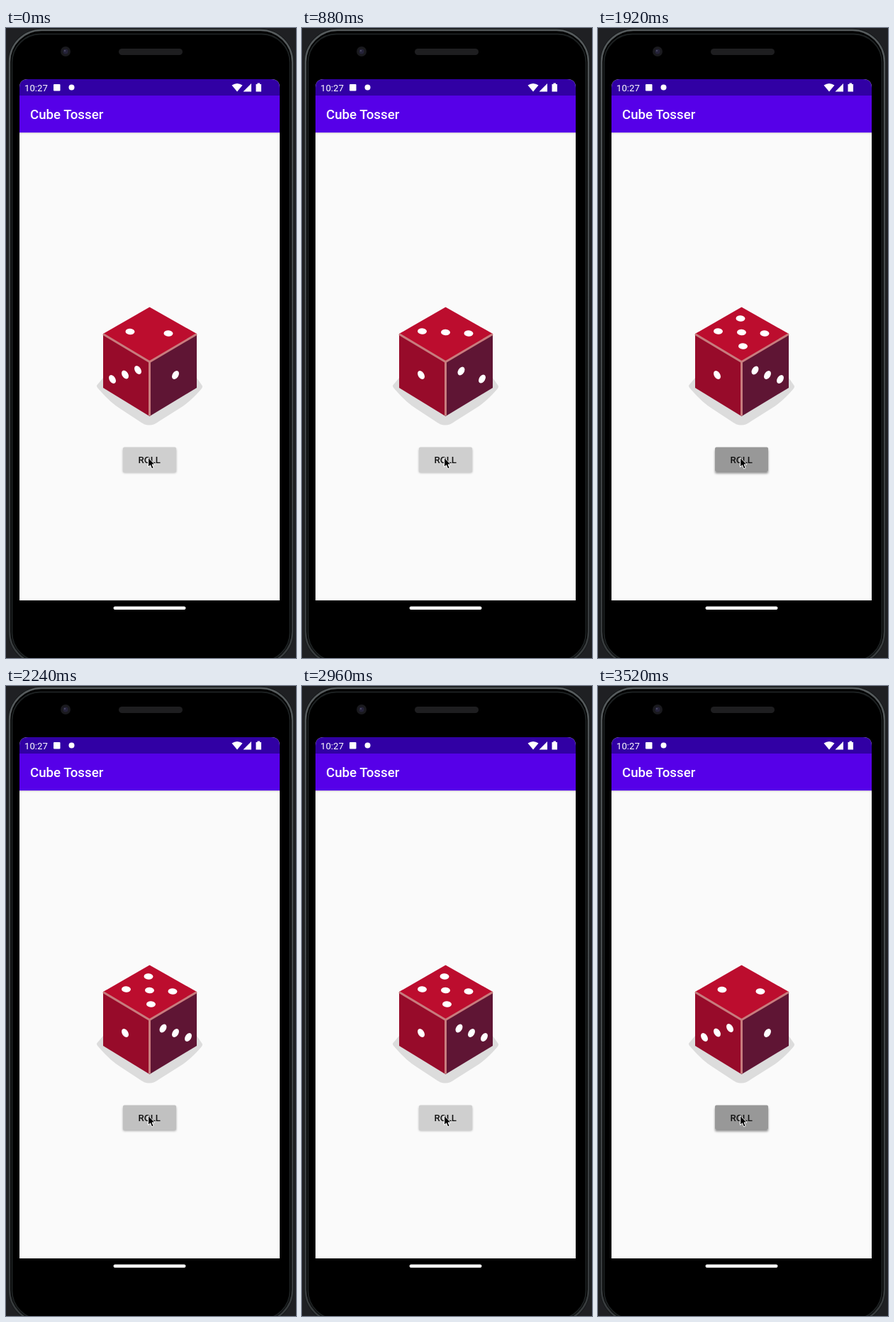
These frames come from a looping animation (409x886 px, 3.6 s). An HTML page:

```html
<!DOCTYPE html>
<html lang="en">
<head>
<meta charset="utf-8">
<title>Cube Tosser</title>
<style>
  html, body { margin: 0; width: 100%; height: 100%; overflow: hidden; background: #1f2023; }
  svg { display: block; width: 409px; height: 886px; font-family: Roboto, sans-serif; }
</style>
</head>
<body>
<svg viewBox="0 0 409 886">
  <defs>
    <linearGradient id="rim" x2="0" y2="1">
      <stop offset="0" stop-color="#565b5d"/>
      <stop offset=".15" stop-color="#4b5052"/>
      <stop offset="1" stop-color="#373b3d"/>
    </linearGradient>
    <filter id="soft" x="-20%" y="-40%" width="140%" height="180%">
      <feGaussianBlur stdDeviation="1.4"/>
    </filter>
  </defs>

  <!-- phone -->
  <rect width="409" height="886" fill="#1f2023"/>
  <rect x="3" y="1" width="403" height="895" rx="47" fill="#101314"/>
  <rect x="5" y="3" width="399" height="891" rx="45" fill="#000" stroke="url(#rim)" stroke-width="2.5"/>
  <rect x="8.5" y="8.5" width="392" height="882" rx="40" fill="#000" stroke="#1c2021" stroke-width="2"/>
  <rect x="159" y="29" width="90" height="9" rx="4.5" fill="#1e1e20"/>
  <circle cx="84" cy="33" r="7" fill="#1a1a1e"/>
  <circle cx="84" cy="33" r="3.5" fill="#25233a"/>
  <circle cx="83" cy="32" r="1" fill="#55556b"/>

  <!-- screen -->
  <path d="M19 805V84q0-12 12-12H374q12 0 12 12V805z" fill="#fafafa"/>
  <path d="M19 95V84q0-12 12-12H374q12 0 12 12V95z" fill="#3100a4"/>
  <rect x="19" y="147" width="367" height="2" fill="#e3e3e3"/>
  <rect x="19" y="95" width="367" height="52" fill="#5600e8"/>
  <rect x="151.500" y="813.500" width="102" height="4.500" rx="2.250" fill="#fff"/>
  <g fill="#fff">
    <text x="26" y="88.500" font-size="13.200">10:27</text>
    <text x="34" y="128" font-size="18.700" font-weight="500">Cube Tosser</text>
    <rect x="67" y="79" width="9.500" height="9.500" rx="1"/>
    <circle cx="92.500" cy="83.500" r="4"/>
    <path d="M318.500 80.500Q326 75.500 333.500 80.500L326 89.500z"/>
    <path d="M334.500 89.500L346 78V89.500z"/>
    <path d="M352.500 79h2v-1.500h3.500V79h2v10.500h-7.500z"/>
  </g>

  <!-- die -->
  <path d="M137 492L128.500 502Q127 504 130 507Q147 527 162 536L188 553Q202 564 216 553L243 536Q260 526 276 507Q278 504 276 502L269 492z" fill="#dcdcdc"/>
  <path d="M202.500 392.500L269 430L202.500 469L137 430z" fill="#bc0d2e"/>
  <path d="M137 430L202.500 469V546L137 506z" fill="#970b2a"/>
  <path d="M269 430L202.500 469V546L269 506z" fill="#5f1534"/>
  <path d="M137 430.500L202.500 469.500L269 430.500M202.500 469.500V545" fill="none" stroke="#c87c7e" stroke-width="3"/>
  <g id="pips" fill="#fff"></g>

  <!-- button -->
  <rect id="shadow" x="165" width="75" height="34" rx="2" filter="url(#soft)"/>
  <rect id="button" x="165" y="589.500" width="75" rx="2"/>
  <text x="186.500" y="612" font-size="13.100" font-weight="500" fill="#111">ROLL</text>
  <path d="M200.500 604V617.500L203.500 614.800L205.700 619.800L208.200 618.700L206 613.900H210z" fill="#000" stroke="#fff" stroke-width="1"/>
</svg>
<script>
const LOOP = 3600, STEP = 80;
const PRESSES = [320, 1760, 3360];
const ROLL_DELAY = 80;

const leftOne = [[168, 488]], rightOne = [[239, 488]];
const topThree = [[169.5, 426.5], [202.5, 428], [235, 429.5]];
const rolls = [
  { top: [[175, 427], [229, 429.5]], left: [[150, 494], [168, 487.5], [186, 481]], right: rightOne },
  { top: topThree, left: leftOne, right: [[224.5, 482.5], [254, 493.5]] },
  { top: [...topThree, [201, 408.5], [204.5, 447.5]], left: leftOne,
    right: [[221.5, 481.5], ...rightOne, [257, 494]] }
];
const shapes = { top: [6.5, 4.3, 3], left: [4.2, 6.5, -32], right: [4.2, 6.5, 32] };

const byId = id => document.getElementById(id);
const pips = byId('pips'), button = byId('button'), shadow = byId('shadow');
const clamp = v => Math.max(0, Math.min(1, v));

function drawPips(roll) {
  pips.innerHTML = Object.entries(shapes).map(([side, [rx, ry, tilt]]) =>
    roll[side].map(([x, y]) =>
      `<ellipse rx="${rx}" ry="${ry}" transform="translate(${x} ${y}) rotate(${tilt})"/>`
    ).join('')).join('');
}

// Ripple darkens quickly, holds, then fades out.
function pressAmount(t) {
  return Math.max(...PRESSES.map(start => {
    const age = t - start;
    return clamp((age + STEP) / 160) * clamp((560 - age) / 320);
  }));
}

let shown = -1;
function frame(now) {
  const t = Math.floor(now % LOOP / STEP) * STEP;
  const current = PRESSES.filter(start => t >= start + ROLL_DELAY).length % rolls.length;
  if (current !== shown) drawPips(rolls[shown = current]);

  const press = pressAmount(t), gray = Math.round(207 - 55 * press);
  button.setAttribute('fill', `rgb(${gray},${gray},${gray})`);
  button.setAttribute('height', 35.5 - 1.5 * press);
  shadow.setAttribute('y', 591.5 + press);
  shadow.setAttribute('fill-opacity', 0.3 + 0.12 * press);
  requestAnimationFrame(frame);
}
requestAnimationFrame(frame);
</script>
</body>
</html>
```
